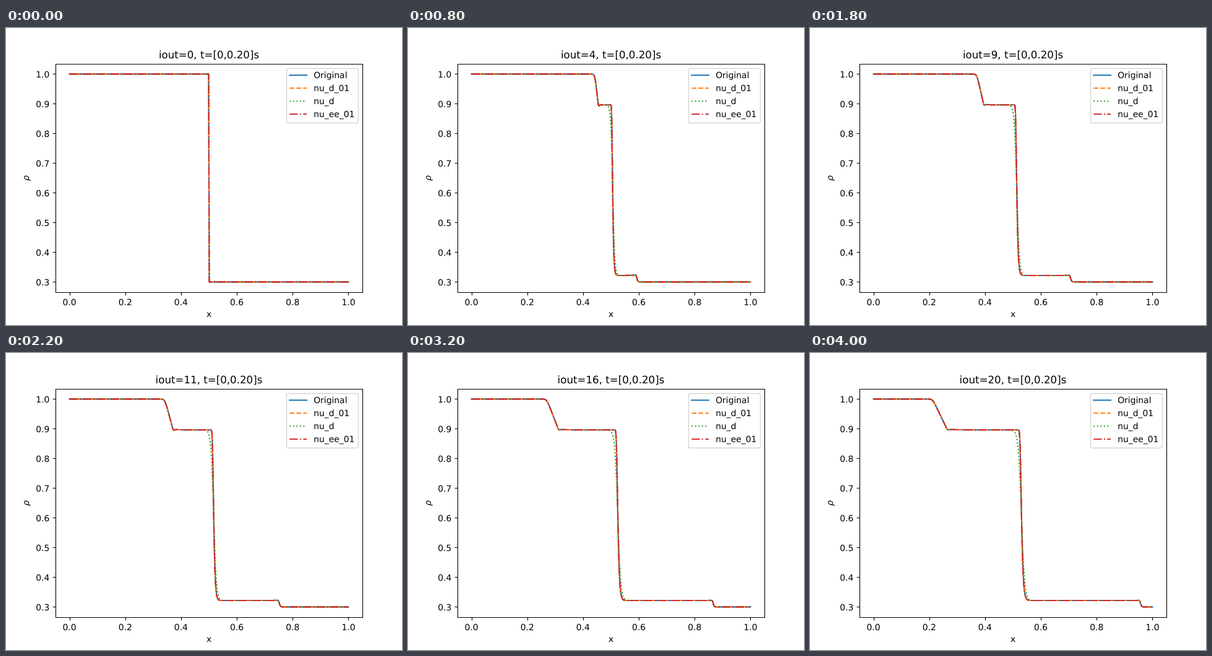
These frames come from a looping animation (640x480 px, 4.2 s). An HTML page:

```html
<!DOCTYPE html>
<html lang="en">
<head>
<meta charset="utf-8">
<title>Density profile</title>
<style>
html, body { margin: 0; width: 100%; height: 100%; overflow: hidden; background: #fff; }
svg { display: block; width: 640px; height: 480px; }
text { font: 13.89px "DejaVu Sans", sans-serif; text-rendering: geometricPrecision; }
</style>
</head>
<body>
<svg id="plot" viewBox="0 0 640 480" fill="none"></svg>
<script>
const STEP = 200, STEPS = 21, POINTS = 500;
const series = [
  { name: 'Original', color: '#1f77b4', dash: 'none', cap: 'square' },
  { name: 'nu_d_01', color: '#ff7f0e', dash: '7.71 3.33' },
  { name: 'nu_d', color: '#2ca02c', dash: '2.08 3.44', diffuse: true },
  { name: 'nu_ee_01', color: '#d62728', dash: '13.33 3.33 2.08 3.33' }
];
const plot = document.getElementById('plot');
const px = x => 102.545 + 450.91 * x;
const py = rho => 74.4 + 480 * (1 - rho);
const snap = v => Math.round(v) + 0.5;

function add(tag, attrs, text = '') {
  const el = document.createElementNS('http://www.w3.org/2000/svg', tag);
  for (const key in attrs) el.setAttribute(key, attrs[key]);
  el.textContent = text;
  return plot.appendChild(el);
}
function label(x, y, text, anchor = 'middle', extra = {}) {
  return add('text', { x, y, 'text-anchor': anchor, fill: '#000', ...extra }, text);
}
function curve(s, d = '') {
  return add('path', {
    d, stroke: s.color, 'stroke-width': 2.083, 'stroke-linejoin': 'round',
    'stroke-dasharray': s.dash, 'stroke-linecap': s.cap || 'butt'
  });
}

// Falling fronts from 1 to 0: sharp shoulder with long foot, and symmetric
const steep = u => 1 - Math.exp(-Math.exp(-u));
const smooth = u => 1 / (1 + Math.exp(u));

// Shock tube density: rarefaction, contact and shock after n outputs
function density(x, n, diffuse) {
  if (n === 0) return x < 0.5 ? 1 : 0.3;
  const spread = n ** 0.3;
  const head = 0.5 - 0.0144 * n, tail = 0.502 - 0.01185 * n;
  const contact = 0.4992 + 0.0015 * n, shock = 0.501 + 0.0228 * n;

  const s = 0.0015 * spread, u = (x - head) / s;
  const ramp = s * (u > 30 ? u : Math.log1p(Math.exp(u)));
  let left = 1 - 0.104 * Math.min(1, ramp / (tail - head));
  if (x > tail) {
    const d = x - tail;
    left += 0.0015 * Math.exp(-d / (0.0025 * n))
      - 0.02 / (n + 1) * Math.exp(-((d / 0.003 - 1) ** 2));
  }
  const mid = diffuse
    ? smooth((x - contact - 0.0012) / (0.0023 * spread))
    : steep((x - contact) / (0.0017 * spread));
  const bump = 0.012 / (n + 1) * Math.exp((x - shock) / 0.02);
  return 0.3 + (0.0215 + bump) * steep((x - shock) / 0.0022) + (left - 0.3215) * mid;
}

function trace(n, diffuse) {
  let d = '';
  for (let i = 0; i < POINTS; i++) {
    const x = i / (POINTS - 1);
    d += (i ? 'L' : 'M') + px(x).toFixed(2) + ' ' + py(density(x, n, diffuse)).toFixed(2);
  }
  return d;
}

const curves = series.map(s => curve(s));

let ticks = '';
for (let i = 0; i <= 5; i++) {
  const x = px(i / 5);
  ticks += `M${snap(x)} 427.5v4.86`;
  label(x, 448, (i / 5).toFixed(1));
}
for (let i = 3; i <= 10; i++) {
  const y = py(i / 10);
  ticks += `M80.5 ${snap(y)}h-4.86`;
  label(70.3, y + 5.2, (i / 10).toFixed(1), 'end');
}
add('path', { d: ticks + 'M80.5 58.5H576.5V427.5H80.5Z', stroke: '#000', 'stroke-width': 1.11 });

const title = label(328, 49.2, '', 'middle', { style: 'font-size:16.67px' });
label(328, 467, 'x');
label(0, 0, 'ρ', 'middle', { transform: 'translate(37 242.6) rotate(-90)', 'font-style': 'italic', style: 'font-style:italic' });

add('rect', {
  x: 453.5, y: 65.5, width: 116, height: 88, rx: 2.78,
  fill: '#fff', stroke: '#ccc', 'stroke-width': 1.39, opacity: 0.8
});
series.forEach((s, i) => {
  const y = 76.3 + 21 * i;
  curve(s, `M458.3 ${y}h27.78`);
  label(497.2, y + 4.9, s.name, 'start');
});

let shown = -1;
function draw() {
  const n = Math.floor(performance.now() / STEP) % STEPS;
  if (n !== shown) {
    shown = n;
    title.textContent = `iout=${n}, t=[0,0.20]s`;
    curves.forEach((c, i) => c.setAttribute('d', trace(n, series[i].diffuse)));
  }
  requestAnimationFrame(draw);
}
draw();
</script>
</body>
</html>
```
